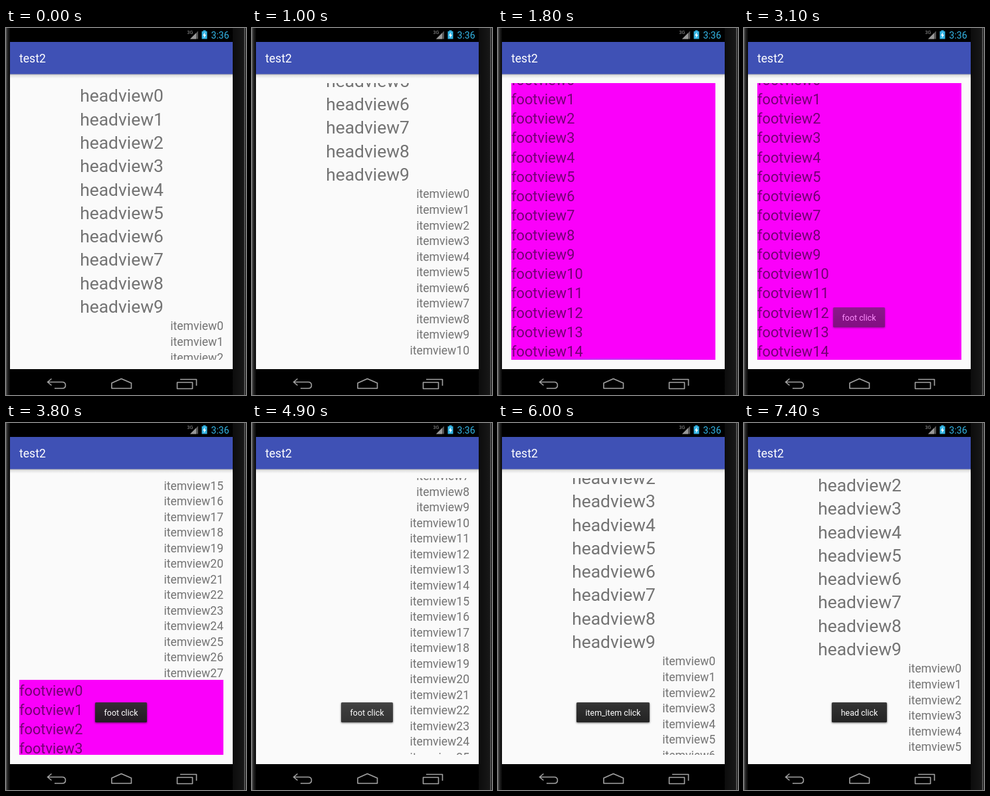
Recreate the animation shown at these times as an HTML page. Size 361x553 px, loop 8.3 s.

```html
<!DOCTYPE html>
<html lang="en">
<head>
<meta charset="utf-8">
<title>List with head and foot views</title>
<style>
html, body { margin: 0; width: 100%; height: 100%; overflow: hidden; background: #000; }
svg { display: block; width: 361px; height: 553px; font-family: Roboto, sans-serif; }
</style>
</head>
<body>
<svg viewBox="0 0 361 553" xmlns="http://www.w3.org/2000/svg">
  <defs>
    <clipPath id="view"><rect x="20" y="83" width="307" height="417"/></clipPath>
    <linearGradient id="shade" x2="0" y2="1">
      <stop offset="0" stop-color="#000" stop-opacity=".34"/>
      <stop offset=".35" stop-color="#000" stop-opacity=".1"/>
      <stop offset="1" stop-color="#000" stop-opacity="0"/>
    </linearGradient>
    <linearGradient id="left">
      <stop offset="0" stop-color="#2c2c2c"/>
      <stop offset=".6" stop-color="#1c1c1c"/>
      <stop offset="1" stop-color="#060606"/>
    </linearGradient>
    <linearGradient id="right">
      <stop offset="0" stop-color="#0c0c0c"/>
      <stop offset="1" stop-color="#1a1a1a"/>
    </linearGradient>
    <linearGradient id="toastFill" x2="0" y2="1">
      <stop offset="0" stop-color="#303030"/>
      <stop offset="1" stop-color="#1e1e1e"/>
    </linearGradient>
    <radialGradient id="blue">
      <stop offset="0" stop-color="#33b5e5" stop-opacity=".7"/>
      <stop offset="1" stop-color="#33b5e5" stop-opacity=".1"/>
    </radialGradient>
    <filter id="soft" x="-10%" y="-40%" width="120%" height="180%"><feGaussianBlur stdDeviation="1.8"/></filter>
  </defs>

  <rect width="361" height="553"/>
  <rect width="6" height="553" fill="url(#left)"/>
  <rect width="1.500" height="553" fill="#505050"/>
  <rect x="341" width="20" height="553" fill="url(#right)"/>
  <rect x="358" width="2" height="553" fill="#505050"/>
  <rect x="6" y="69" width="335" height="445" fill="#fafafa"/>
  <rect x="6" y="69" width="335" height="7" fill="url(#shade)"/>
  <rect x="6" width="335" height="21"/>
  <rect x="6" y="21" width="335" height="48.500" fill="#3f51b5"/>
  <rect x="6" y="514" width="335" height="39"/>
  <text x="20" y="52" font-size="17.600" fill="#fff">test2</text>

  <text x="272.500" y="9" font-size="7" fill="#999">3G</text>
  <path d="M277 16.500L289 4.500V16.500Z" fill="#555"/>
  <path d="M277 16.500L286 7.500V16.500Z" fill="#999"/>
  <path d="M294.500 5H296.500V3.500H300.500V5H302.500V16.500H294.500Z" fill="#33b5e5"/>
  <path d="M299.500 6L296 11.500H298.200L297.500 15.500L301 10H298.800Z" fill="#fff"/>
  <text x="308.500" y="15.500" font-size="14.100" fill="#33b5e5">3:36</text>

  <g fill="none" stroke="#a2a2a2" stroke-width="1.600" stroke-linejoin="round">
    <path d="M68.500 528.500L62.500 533.500L68.500 538.500M62.500 533.500H84.500Q89.500 533.500 89.500 538.300Q89.500 543 84.500 543H73"/>
    <path d="M159 543V535L173.500 528.500L188.500 535V543Z"/>
    <path d="M257.500 534H280.500V543.500H257.500ZM262 529.500H286.500V539"/>
  </g>

  <g clip-path="url(#view)">
    <g id="list" fill="#000" fill-opacity=".54"></g>
    <ellipse id="glow" cx="173.500" cy="500" rx="154" ry="0" fill="url(#blue)"/>
  </g>
  <g id="toasts"></g>
</svg>
<script>
const NS = "http://www.w3.org/2000/svg";
const LOOP = 8300, STEP = 100;
const list = document.getElementById("list");
const glow = document.getElementById("glow");

function add(parent, tag, attrs, text) {
  const el = document.createElementNS(NS, tag);
  for (const key in attrs) el.setAttribute(key, attrs[key]);
  if (text) el.textContent = text;
  parent.appendChild(el);
  return el;
}

// Adds equal rows below y and returns the bottom edge.
function addRows(name, count, y, { pitch, base, size, x, anchor }) {
  for (let i = 0; i < count; i++) {
    add(list, "text", {
      x, y: Math.round(y + i * pitch + base),
      "font-size": size, "text-anchor": anchor
    }, name + i);
  }
  return y + count * pitch;
}

const headEnd = addRows("headview", 10, 83.4,
  { pitch: 35.28, base: 28, size: 26.4, x: 174, anchor: "middle" });
const itemEnd = addRows("itemview", 28, headEnd,
  { pitch: 23.54, base: 19.25, size: 17.55, x: 327, anchor: "end" });
add(list, "rect", { x: 20, y: Math.round(itemEnd), width: 307, height: 440, fill: "#fa00fa", "fill-opacity": 1 });
addRows("footview", 15, itemEnd,
  { pitch: 29.25, base: 23.3, size: 21.75, x: 20, anchor: "start" });

function makeToast(label, x, width, start, end) {
  const g = add(document.getElementById("toasts"), "g", { opacity: 0 });
  const box = { x, y: 421, width, height: 30, rx: 1.5 };
  add(g, "rect", { ...box, y: 422, fill: "#000", opacity: .6, filter: "url(#soft)" });
  add(g, "rect", { ...box, fill: "url(#toastFill)", "fill-opacity": .93 });
  add(g, "text", { x: x + width / 2, y: 441, "font-size": 12.4, fill: "#fff", "text-anchor": "middle" }, label);
  return { g, start, end };
}

const toasts = [
  makeToast("foot click", 134, 78, 3000, 4900),
  makeToast("item_item click", 118, 110, 5000, 6900),
  makeToast("head click", 132, 83, 7000, LOOP)
];

const clamp = v => Math.min(1, Math.max(0, v));
const smooth = u => u * u * (3 - 2 * u);
const speedUp = u => u * u;
const slowDown = p => u => 1 - Math.pow(1 - u, p);

const moves = [
  { start: 700, end: 1400, to: 505, ease: smooth },
  { start: 1600, end: 1800, to: 1033, ease: speedUp },
  { start: 3500, end: 4400, to: 533.6, ease: slowDown(2.6) },
  { start: 5000, end: 6200, to: 78.5, ease: slowDown(2.05) }
];

function scrollAt(t) {
  let pos = 0;
  for (const m of moves) {
    pos += (m.to - pos) * m.ease(clamp((t - m.start) / (m.end - m.start)));
  }
  return pos;
}

function glowAt(t) {
  if (t < 1800 || t >= 2700) return 0;
  return t < 2000 ? 3 + (t - 1800) / 22 : 12 * Math.pow((2700 - t) / 700, .4);
}

function toastAlpha(t, { start, end }) {
  const shown = slowDown(1.6)(clamp((t - start + STEP) / 500));
  const left = t < end ? 1 : clamp(.93 - (t - end) / 240);
  return shown * left;
}

function draw(time) {
  const t = Math.floor((time % LOOP) / STEP) * STEP;
  list.setAttribute("transform", `translate(0 ${-Math.round(scrollAt(t))})`);
  const h = glowAt(t);
  glow.setAttribute("ry", h);
  glow.setAttribute("opacity", Math.min(1, h / 6));
  for (const toast of toasts) toast.g.setAttribute("opacity", toastAlpha(t, toast));
}

let origin;
function tick(now) {
  if (origin === undefined) origin = now;
  draw(now - origin);
  requestAnimationFrame(tick);
}
draw(0);
requestAnimationFrame(tick);
</script>
</body>
</html>
```
